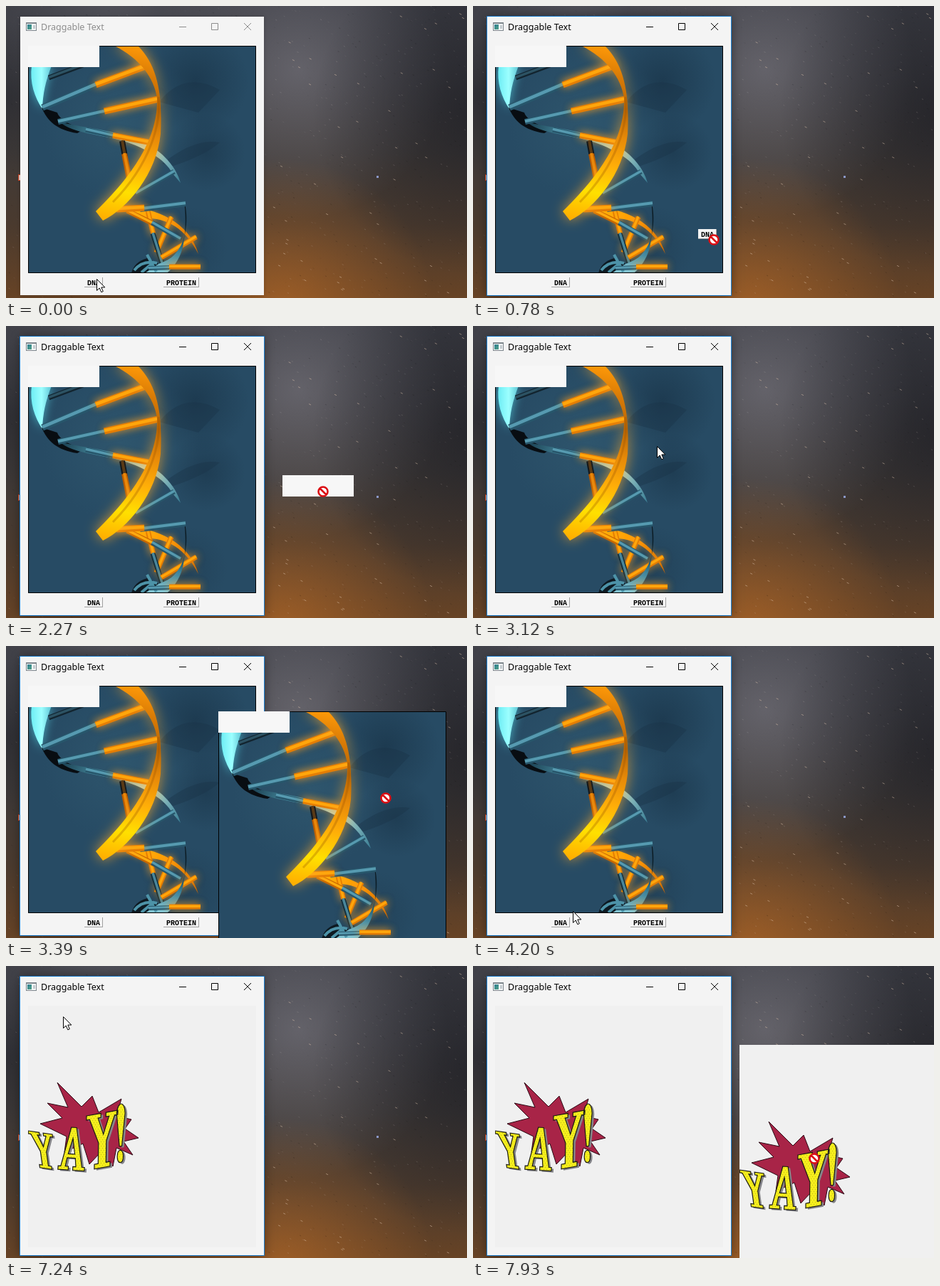
Animation, 647 px wide and 411 px high, one loop 8000 ms. Source, as an HTML page with a canvas:

```html
<!DOCTYPE html>
<html>
<head>
<meta charset="utf-8">
<style>
html, body { margin: 0; width: 100%; height: 100%; overflow: hidden; background: #333; }
canvas { display: block; }
</style>
</head>
<body>
<canvas id="stage" width="647" height="411"></canvas>
<script>
const W = 647, H = 411, LOOP = 8000;
const ctx = document.getElementById('stage').getContext('2d');

function layer(w, h, paint) {
  const c = document.createElement('canvas');
  c.width = w; c.height = h;
  paint(c.getContext('2d'));
  return c;
}
function box(g, x, y, w, h, color) { g.fillStyle = color; g.fillRect(x, y, w, h); }
function stroke(g, d, width, color, cap = 'butt') {
  g.lineWidth = width; g.strokeStyle = color; g.lineCap = cap;
  g.stroke(new Path2D(d));
}
function fill(g, d, color) { g.fillStyle = color; g.fill(new Path2D(d)); }
function blend(g, x0, y0, x1, y1, ...colors) {
  const gr = g.createLinearGradient(x0, y0, x1, y1);
  colors.forEach((c, i) => gr.addColorStop(i / (colors.length - 1), c));
  return gr;
}
function glow(g, x, y, r, rgb, alpha) {
  const gr = g.createRadialGradient(x, y, 0, x, y, r);
  gr.addColorStop(0, `rgba(${rgb},${alpha})`);
  gr.addColorStop(1, `rgba(${rgb},0)`);
  box(g, x - r, y - r, 2 * r, 2 * r, gr);
}

// Night sky behind the window
const sky = layer(W, H, g => {
  box(g, 0, 0, W, H, blend(g, 0, 0, 0, H, '#3a3b42', '#3d3c40', '#3f3a38', '#4a3a2e', '#674325'));
  glow(g, 410, 90, 210, '138,136,146', .5);
  glow(g, 150, -20, 200, '130,130,140', .3);
  glow(g, 390, 425, 210, '200,115,40', .55);
  glow(g, 660, 150, 230, '18,20,28', .55);
  glow(g, 0, 130, 110, '25,28,36', .4);
  let seed = 7;
  const rnd = () => (seed = seed * 16807 % 2147483647) / 2147483647;
  for (let i = 0; i < 900; i++) {
    const x = rnd() * W, y = rnd() * H, light = rnd() > .4;
    stroke(g, `M${x} ${y}l2 1`, 1, light ? `rgba(215,205,200,${rnd() * .2})` : `rgba(0,0,0,${rnd() * .2})`);
  }
  for (let i = 0; i < 45; i++) {
    const x = 363 + rnd() * 284, y = rnd() * H;
    stroke(g, `M${x} ${y}l3 1.5`, 1, 'rgba(225,200,175,.5)');
  }
  box(g, 520, 239, 3, 3, '#8b98c8');
  box(g, 17, 237, 4, 9, '#c8401e');
  box(g, 18, 238, 2, 7, '#e8d0c8');
});

const LABEL = '#f7f7f7';

// Rod with a shaded core
function rod(g, x0, y0, x1, y1, w, dark, light) {
  const d = `M${x0} ${y0}L${x1} ${y1}`;
  stroke(g, d, w, dark);
  g.save();
  g.translate(0, -w * .1);
  stroke(g, d, w * .5, light);
  g.restore();
}
const teal = (g, a, b, c, d, w = 7) => rod(g, a, b, c, d, w, '#27566b', '#569ab0');
const amber = (g, a, b, c, d, w = 8) => {
  g.save();
  g.shadowColor = 'rgba(255,160,30,.65)'; g.shadowBlur = 12;
  rod(g, a, b, c, d, w, '#e07800', '#ffa60c');
  g.restore();
};

const picture = layer(320, 320, g => {
  box(g, 0, 0, 320, 320, '#274b64');
  glow(g, 235, 50, 75, '24,50,70', .65);
  glow(g, 250, 150, 55, '24,50,70', .55);
  glow(g, 220, 285, 60, '30,58,78', .5);
  glow(g, 130, 110, 110, '60,105,125', .35);
  g.translate(-31, -56);
  fill(g, 'M219 222Q265 185 300 192Q280 210 235 225ZM215 135Q250 90 300 118L270 150Z', 'rgba(25,52,72,.4)');

  // Upper left strand
  g.save();
  g.shadowColor = '#49b5c8'; g.shadowBlur = 14;
  fill(g, 'M36 84L64 84C55 108 52 122 51 145C40 128 33 108 36 84Z', blend(g, 36, 0, 64, 0, '#70eef5', '#9cffff', '#5fc4d4'));
  g.restore();
  fill(g, 'M50 143C58 162 72 175 100 179L112 172C90 170 74 158 72 150Z', '#080d12');
  fill(g, 'M75 163C110 172 165 176 200 195C225 210 240 230 245 249L234 236C222 214 195 200 165 190C130 180 95 180 75 163Z',
    blend(g, 75, 160, 245, 245, '#173a4c', '#4a90a5', '#bde6de', '#3d8096'));

  // Rungs of the upper turn
  rod(g, 60, 101, 108, 83, 7, '#12242f', '#2c5263');
  teal(g, 51, 143, 128, 110, 9);
  amber(g, 126, 111, 198, 84, 9);
  teal(g, 73, 163, 140, 148, 8);
  amber(g, 138, 148, 214, 131, 9);
  teal(g, 112, 174, 152, 183);
  amber(g, 150, 182, 202, 192);
  rod(g, 163, 190, 167, 212, 8, '#14191c', '#5a3a16');
  rod(g, 166, 208, 173, 243, 8, '#b85a00', '#e88608');
  teal(g, 236, 233, 182, 264, 7);

  // Lower turn
  g.save();
  g.shadowColor = 'rgba(255,160,30,.5)'; g.shadowBlur = 8;
  fill(g, 'M165 284C205 282 257 302 270 349C250 310 222 296 185 299Z', blend(g, 165, 284, 270, 349, '#ffc400', '#ff9a08', '#c86400'));
  g.restore();
  amber(g, 232, 297, 211, 347, 7);
  amber(g, 199, 288, 207, 322, 7);
  rod(g, 206, 320, 219, 362, 7, '#14303d', '#48869b');
  rod(g, 170, 288, 208, 307, 7, '#c86800', '#ffae10');
  teal(g, 205, 305, 245, 328);
  amber(g, 267, 325, 218, 354, 7);
  fill(g, 'M250 274C256 295 256 335 232 354C218 364 200 366 183 376L226 376C238 365 246 352 249 335C253 312 252 290 250 274Z',
    blend(g, 250, 276, 215, 372, '#0b151b', '#0d222e', '#3c8299', '#82c4d2'));
  fill(g, 'M176 376Q180 360 198 355L214 363L195 376Z', '#0d1a22');
  stroke(g, 'M180 372Q192 357 212 362M190 375L208 360M198 350L211 374', 4, '#4d93a8');
  teal(g, 200, 369, 232, 368, 6);
  amber(g, 229, 367, 273, 367, 7);
  teal(g, 252, 278, 188, 286, 8);
  amber(g, 194, 284, 155, 286, 9);

  // Main orange strand
  g.save();
  g.shadowColor = 'rgba(255,170,40,.75)'; g.shadowBlur = 18;
  fill(g, 'M150 55C186 72 208 100 212 130C213 172 195 222 126 289L136 302C172 284 211 236 217 180C220 122 212 82 184 55Z',
    blend(g, 190, 56, 140, 298, '#ff9a08', '#d87a06', '#b86504', '#e88a08', '#ffae08', '#ffe000', '#ffb000'));
  g.restore();
  stroke(g, 'M214 128C218 165 203 222 150 276', 3, 'rgba(150,80,0,.3)');

  g.setTransform(1, 0, 0, 1, 0, 0);
  stroke(g, 'M.5 .5H319.5V319.5H.5Z', 1, '#000');
  box(g, 0, 0, 100, 30, LABEL);
});

const empty = layer(100, 30, g => box(g, 0, 0, 100, 30, LABEL));

const tag = (text, w) => layer(w, 14, g => {
  box(g, 0, 0, w, 14, '#a0a0a0');
  box(g, 0, 0, w - 1, 13, '#f5f5f5');
  g.font = 'bold 10px "Liberation Mono", monospace';
  g.fillStyle = '#000';
  g.fillText(text, 4, 10.5);
});
const dna = tag('DNA', 26), protein = tag('PROTEIN', 50);

const cheer = layer(320, 340, g => {
  box(g, 0, 0, 320, 340, '#f0f0f0');
  g.translate(-31, -56);
  const burst = 'M72 164L106 198L121 183L130 206L162 187L155 211L176 216L167 229L186 242L165 247L178 266L155 256' +
    'L150 282L133 262L117 279L108 250L82 262L85 240L48 222L79 214L58 193L87 199Z';
  fill(g, burst, '#a82447');
  stroke(g, burst, 1, '#2a0a14');
  const Y = 'M0 0H4.6V1.1H3.7L5.5 5.5L7.2 1.1H6.2V0H10V1.1H9L6.5 7.3V12.8H7.8V14H2.8V12.8H4V7.5L1 1.1H0Z';
  const A = 'M4 0H6L9 12.8H10V14H5.6V12.8H6.7L6.3 10H3.2L2.7 12.8H3.9V14H0V12.8H1ZM3.5 8.7H6L4.9 3.6Z';
  const bang = 'M1 2C2 -1 9 -1 9.5 2L6.5 10H4ZM5 11C9 11 9 14 5 14S1 11 5 11Z';
  const letters = new Path2D();
  [[Y, 3.4, .5, .5, 3.6, 31, 232], [A, 3.7, .25, -.3, 4.3, 77, 226],
   [Y, 4.4, -.8, -.1, 5.5, 113, 211], [bang, 1.4, -.1, -.05, 5.8, 154, 196]]
    .forEach(([d, ...m]) => letters.addPath(new Path2D(d), new DOMMatrix(m)));
  g.translate(3, 2);
  g.fillStyle = '#85858a'; g.fill(letters, 'evenodd');
  g.translate(-3, -2);
  g.fillStyle = '#f5ee1c'; g.fill(letters, 'evenodd');
  g.save();
  g.clip(letters, 'evenodd');
  for (let y = 190; y < 292; y += 3)
    for (let x = 31 + y % 2 * 2; x < 175; x += 4) box(g, x, y, 1, 1, '#c2b81c');
  g.restore();
  g.lineWidth = 1.2; g.strokeStyle = '#1a1a10'; g.stroke(letters);
});

// Dragged item: image and grip point
const items = {
  dna: [dna, 14, 6],
  label: [empty, 49, 14],
  pic: [picture, 227, 113],
  yay: [cheer, 97, 151]
};

// Pointer: time, x, y, dragged item
const steps = [
  [0, 127, 384],
  [540, 150, 375, 'dna'], [670, 330, 320, 'dna'], [800, 480, 265, 'dna'], [930, 580, 235, 'dna'],
  [1060, 430, 240], [1190, 265, 241], [1330, 80, 70],
  [1590, 86, 71, 'label'], [1730, 160, 100, 'label'], [1870, 290, 160, 'label'], [2000, 400, 205, 'label'],
  [2140, 437, 224, 'label'], [2280, 400, 205, 'label'], [2420, 330, 190], [2550, 275, 176],
  [2680, 265, 173], [2820, 260, 170], [2970, 258, 169],
  [3260, 400, 190, 'pic'], [3390, 525, 205, 'pic'], [3540, 440, 190, 'pic'], [3670, 341, 175, 'pic'],
  [3820, 330, 195], [3960, 270, 260], [4080, 190, 330], [4200, 140, 373], [4330, 124, 387],
  [4480, 150, 370, 'dna'], [4610, 240, 325, 'dna'], [4750, 330, 292, 'dna'], [4900, 385, 270, 'dna'],
  [5040, 401, 235, 'dna'], [5180, 370, 195, 'dna'], [5320, 310, 160, 'dna'], [5460, 240, 130, 'dna'],
  [5600, 180, 108, 'dna'], [5740, 125, 92, 'dna'], [5880, 87, 79, 'dna'], [6010, 80, 71, 'dna'],
  [7240, 80, 71], [7410, 102, 162], [7590, 128, 207],
  [7760, 300, 235, 'yay'], [7930, 471, 262, 'yay']
];

function drawWindow(active) {
  ctx.save();
  ctx.shadowColor = `rgba(0,0,0,${active ? .45 : .2})`;
  ctx.shadowBlur = active ? 14 : 6;
  box(ctx, 20, 15, 342, 392, '#f4f4f4');
  ctx.restore();
  if (active) stroke(ctx, 'M19.5 14.5H362.5V407.5H19.5Z', 1, '#1c7fd0');
  const ink = active ? '#000' : '#8c8c8c';
  box(ctx, 28, 23, 15, 12, '#7d868c');
  box(ctx, 29, 25, 13, 9, '#f4f6f7');
  box(ctx, 30, 26, 6, 7, blend(ctx, 30, 26, 36, 33, '#2f7f92', '#4f9f86'));
  box(ctx, 38, 27, 3, 5, '#c5cbd0');
  ctx.font = '12.5px "Noto Sans", "Open Sans", sans-serif';
  ctx.fillStyle = ink;
  ctx.fillText('Draggable Text', 49, 34);
  stroke(ctx, 'M243 29.5H253M288.5 24.5H297.5V33.5H288.5Z', 1, ink);
  stroke(ctx, 'M334 24L344 34M344 24L334 34', 1, ink);
}

function drawPointer(x, y, drag) {
  const onLabel = x > 31 && x < 131 && y > 56 && y < 86;
  ctx.save();
  ctx.translate(x, y);
  if (drag && !onLabel) {
    ctx.translate(8, 9);
    fill(ctx, 'M-7 0A7 7 0 1 0 7 0A7 7 0 1 0 -7 0Z', '#fff');
    stroke(ctx, 'M-6.5 0A6.5 6.5 0 1 0 6.5 0A6.5 6.5 0 1 0 -6.5 0ZM-4.5 -4.5L4.5 4.5', 2.6, '#dc0f14');
  } else {
    const arrow = 'M.5 .5V16.5L4.2 13L6.8 18.8L9.3 17.7L6.8 12H11.8Z';
    fill(ctx, arrow, '#fff');
    stroke(ctx, arrow, 1, '#000');
    if (drag) {
      box(ctx, 11, 19, 9, 9, '#000');
      box(ctx, 12, 20, 7, 7, '#fff');
      box(ctx, 13, 23, 5, 1, '#000');
      box(ctx, 15, 21, 1, 5, '#000');
    }
  }
  ctx.restore();
}

function draw(now) {
  const t = now % LOOP;
  ctx.drawImage(sky, 0, 0);
  drawWindow(t >= 400);
  ctx.drawImage(protein, 221, 382);
  ctx.drawImage(dna, 110, 382);
  ctx.drawImage(t < 7240 ? picture : cheer, 31, 56);
  const [, x, y, drag] = steps.findLast(s => s[0] <= t);
  if (drag) {
    const [img, gx, gy] = items[drag];
    ctx.drawImage(img, x - gx, y - gy);
  }
  drawPointer(x, y, drag);
}

const start = performance.now();
function tick() {
  draw(performance.now() - start);
  requestAnimationFrame(tick);
}
tick();
</script>
</body>
</html>
```
